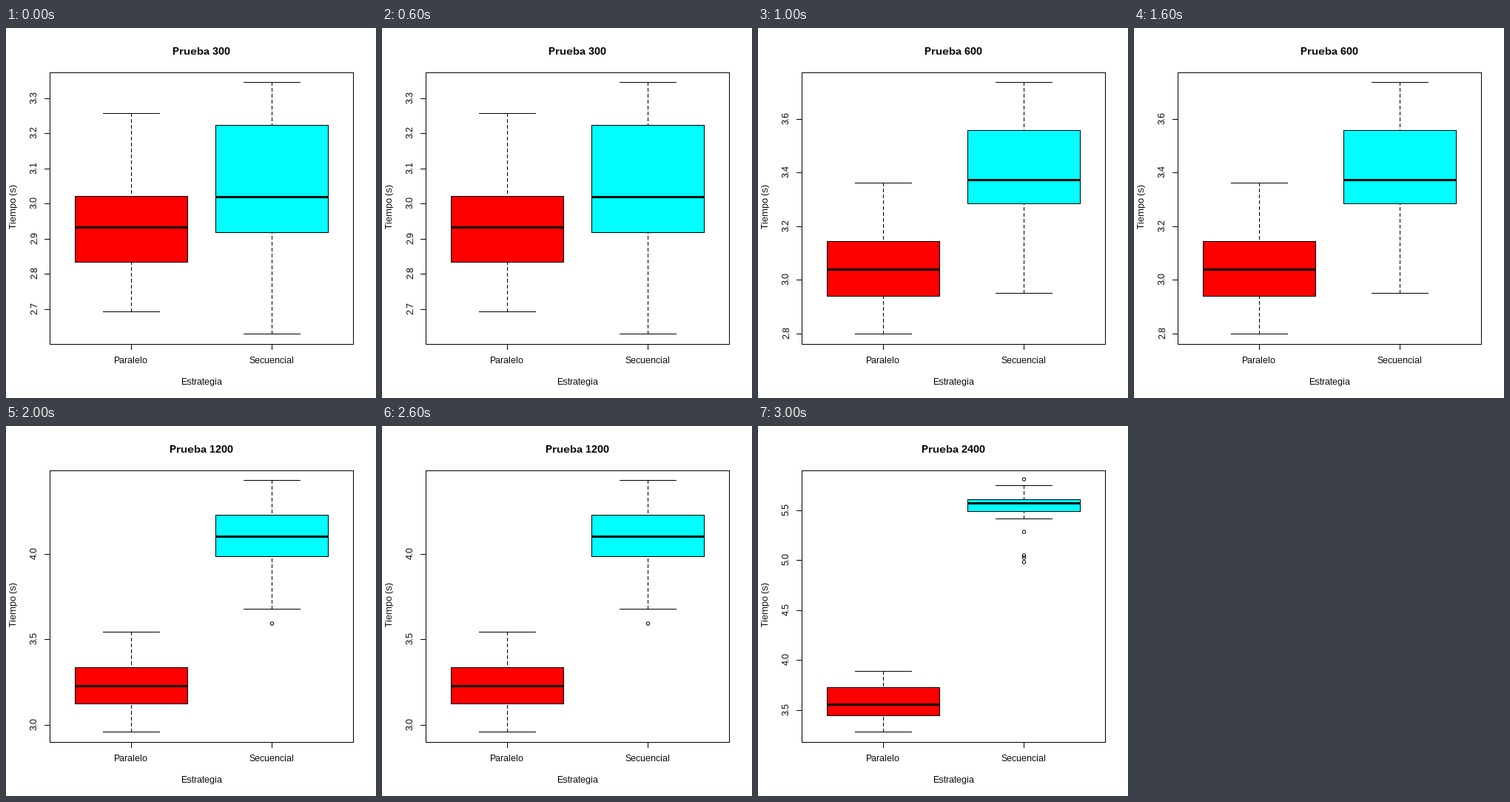
Animation of 500 by 500 pixels, one loop 4 s. Source, as a matplotlib script:

```python
import matplotlib.pyplot as plt
import numpy as np
from matplotlib.animation import ArtistAnimation
from matplotlib.patches import Circle, Rectangle

SIZE, DPI = 500, 100
PX = 72 / DPI  # one pixel in points
LEFT, RIGHT, TOP, BOTTOM = 59, 469, 59, 426
BOXES = ((169, "Paralelo", "#ff0000"), (359, "Secuencial", "#00ffff"))

# Tick ranges are (first value, last value, count, first y, last y).
# Box levels are y pixels: upper whisker, Q3, median, Q1, lower whisker.
TRIALS = (
    dict(size=300, ticks=(2.7, 3.3, 7, 379, 94), outliers=(),
         boxes=((114, 226, 268, 315, 382), (72, 130, 227, 275, 412))),
    dict(size=600, ticks=(2.8, 3.6, 5, 412, 122), outliers=(),
         boxes=((208, 287, 325, 361, 412), (72, 137, 204, 236, 357))),
    dict(size=1200, ticks=(3.0, 4.0, 3, 403, 172), outliers=(267,),
         boxes=((277, 325, 350, 374, 412), (72, 119, 148, 175, 246))),
    dict(size=2400, ticks=(3.5, 5.5, 5, 383, 113),
         outliers=(72, 143, 175, 178, 184),
         boxes=((330, 352, 375, 390, 412), (79, 98, 103, 114, 124))),
)

# Native hinting gives whole-pixel glyph advances.
plt.rcParams.update({"font.family": "Liberation Sans",
                     "text.hinting": "native", "text.hinting_factor": 1})
fig = plt.figure(figsize=(SIZE / DPI, SIZE / DPI), dpi=DPI, facecolor="white")
ax = fig.add_axes([0, 0, 1, 1])
# Whole numbers fall on pixel edges, so snapping picks the pixel they name.
ax.set(xlim=(0, SIZE), ylim=(SIZE - 1, -1))
ax.axis("off")


def line(xs, ys, width=1, **style):
    return ax.plot(xs, ys, color="black", lw=width * PX, antialiased=False,
                   scalex=False, scaley=False, **style)[0]


def rect(x0, y0, x1, y1, fill):
    return ax.add_patch(Rectangle((x0, y0), x1 - x0, y1 - y0, facecolor=fill,
                                  edgecolor="black", lw=PX, antialiased=False,
                                  zorder=2))


def label(x, y, text, size=12, **style):
    return ax.text(x, y, text, fontsize=size * PX, ha="center", va="baseline",
                   rotation_mode="anchor", **style)


def box(x, levels, fill):
    high, q3, median, q1, low = levels
    parts = [rect(x - 76, q3, x + 76, q1, fill),
             line([x - 76, x + 76], [median] * 2, 3, solid_capstyle="butt")]
    for end, edge in ((high, q3), (low, q1)):
        parts.append(line([x, x], [end, edge], ls=(0, (5, 3)),
                          dash_capstyle="butt"))
        parts.append(line([x - 38, x + 38], [end] * 2))
    return parts


def axis(first, last, count, y_first, y_last):
    parts = []
    for value, y in zip(np.linspace(first, last, count),
                        np.linspace(y_first, y_last, count)):
        y = int(y)
        parts.append(line([LEFT - 7, LEFT], [y, y]))
        parts.append(label(42, y - 1.6, f"{value:.1f}", rotation=90))
    return parts


def draw_trial(trial):
    parts = [label(264, 35, f"Prueba {trial['size']}", 14, weight="bold")]
    parts += axis(*trial["ticks"])
    for (x, _, fill), levels in zip(BOXES, trial["boxes"]):
        parts += box(x, levels, fill)
    for y in trial["outliers"]:
        center = BOXES[1][0] + 0.5, y - 1
        parts.append(ax.add_patch(Circle(center, 2.2, fill=False,
                                         edgecolor="black", lw=PX, zorder=3)))
    return parts


rect(LEFT, TOP, RIGHT, BOTTOM, "none")
for x, name, _ in BOXES:
    line([x, x], [BOTTOM, BOTTOM + 7])
    label(x - 0.5, 452, name)
label(264, 481, "Estrategia")
label(14, 240, "Tiempo (s)", rotation=90)

anim = ArtistAnimation(fig, [draw_trial(t) for t in TRIALS], interval=1000,
                       repeat=True, repeat_delay=0)
plt.show()
```
